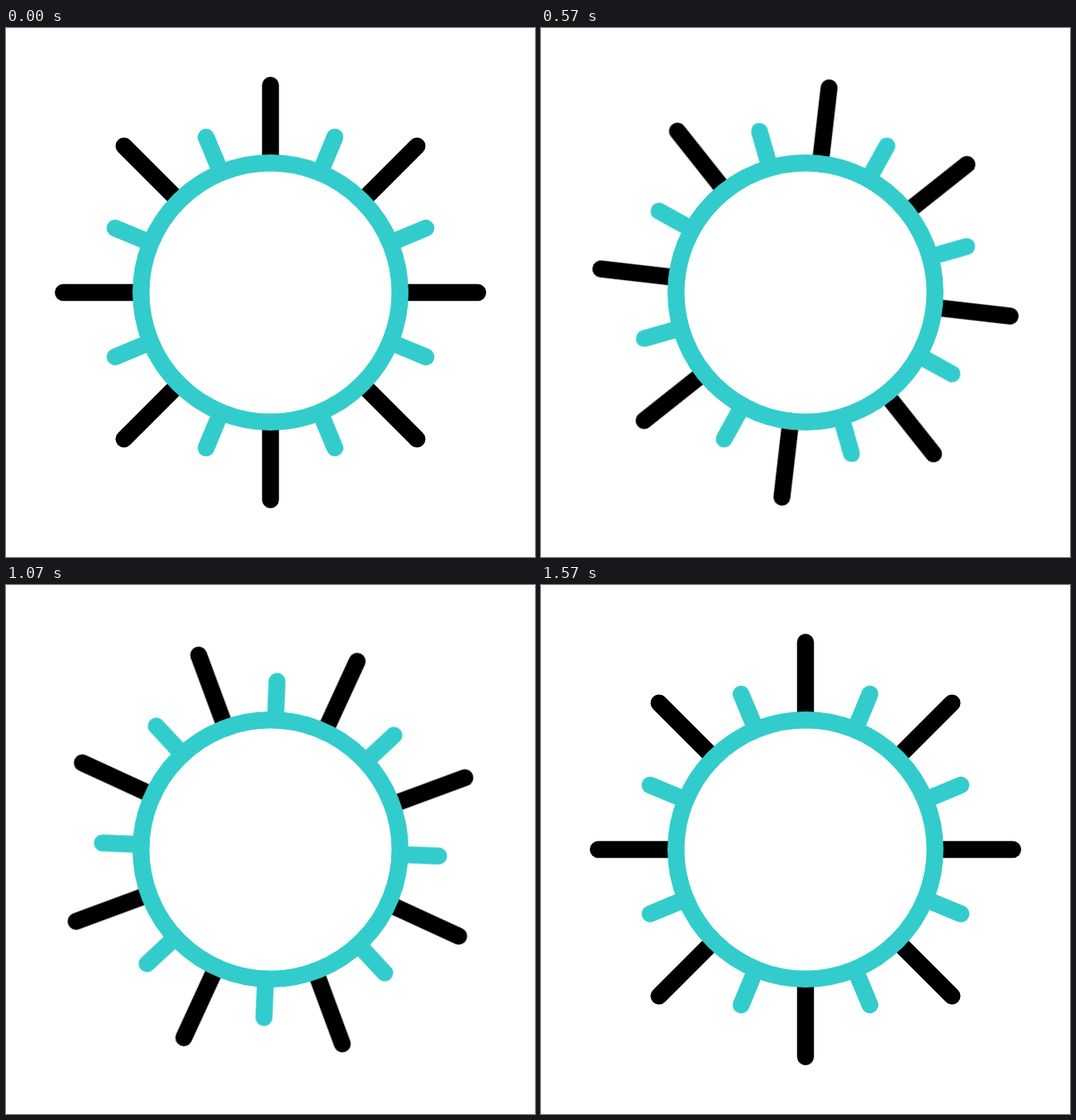
Recreate the animation shown at these times as an HTML page without scripts. Size 640 by 640 pixels, loop 1670 ms.

```html
<!DOCTYPE html>
<html lang="en">
<head>
<meta charset="utf-8">
<title>Sun</title>
<style>
  html, body {
    margin: 0;
    width: 100%;
    height: 100%;
    overflow: hidden;
    background: #fff;
  }

  svg {
    display: block;
    width: 100vw;
    height: 100vh;
    --teal: #33cccc;
    --ease: cubic-bezier(.43, 0, .57, 1);
  }

  .rays {
    transform-origin: 0 0;
    stroke-dasharray: 1 2;
    animation: swing 1670ms infinite, trim 1670ms infinite;
    animation-timing-function: var(--ease);
  }

  .long { stroke: #000; }
  .short, .ring { stroke: var(--teal); }

  /* Wind up counterclockwise, then drift back */
  @keyframes swing {
    0% { transform: rotate(0deg); }
    35.93% { transform: rotate(-38.6deg); }
    94.01%, 100% { transform: rotate(0deg); }
  }

  /* Rays retract towards the ring and extend again */
  @keyframes trim {
    0% { stroke-dashoffset: 0; }
    17.96% { stroke-dashoffset: .853; }
    35.93%, 100% { stroke-dashoffset: 0; }
  }
</style>
</head>
<body>
<svg viewBox="-320 -320 640 640" fill="none" stroke-width="20.5" stroke-linecap="round">
  <defs>
    <g id="pair">
      <line class="long" y1="-157" y2="-250.7" pathLength="1"/>
      <line class="short" y1="-157" y2="-203.5" pathLength="1" transform="rotate(22.5)"/>
    </g>
    <g id="quarter">
      <use href="#pair"/>
      <use href="#pair" transform="rotate(45)"/>
    </g>
  </defs>
  <g class="rays">
    <use href="#quarter"/>
    <use href="#quarter" transform="rotate(90)"/>
    <use href="#quarter" transform="rotate(180)"/>
    <use href="#quarter" transform="rotate(270)"/>
  </g>
  <circle class="ring" r="156.7"/>
</svg>
</body>
</html>
```
